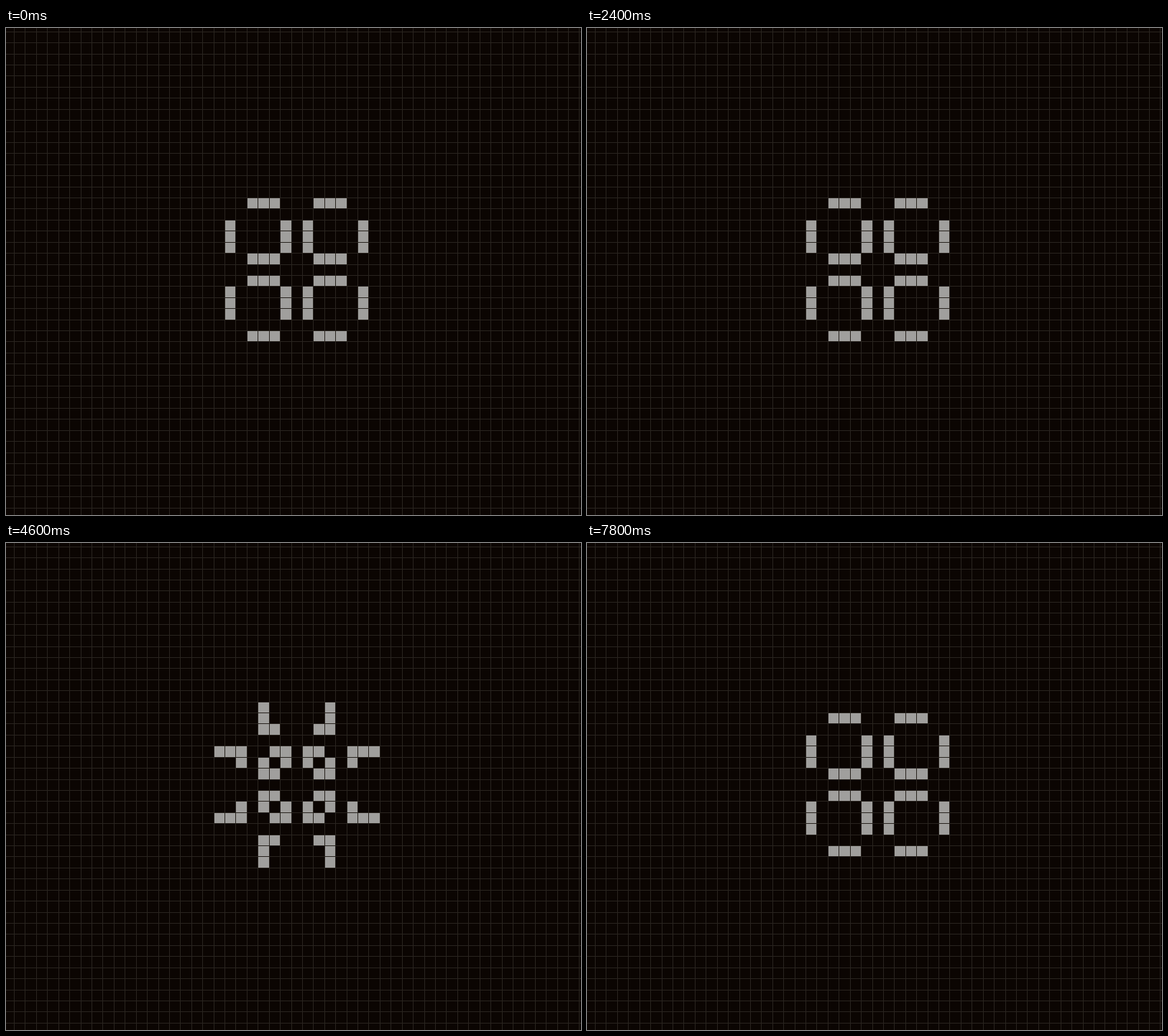
Write an HTML page with a canvas that moves like this. It is 800 by 678 pixels and loops after 7.9 s.

```html
<!DOCTYPE html>
<html>
<head>
<meta charset="utf-8">
<title>Pulsar</title>
<style>
html, body { margin: 0; width: 100%; height: 100%; overflow: hidden; background: #0b0502; }
canvas { display: block; }
</style>
</head>
<body>
<canvas id="stage" width="800" height="678"></canvas>
<script>
const ctx = document.getElementById('stage').getContext('2d');
const LOOP = 7900, HOLD = 400, STEP = 100;
const PITCH = 15.42, SIZE = 17;

// Pixel positions of the grid lines; board cell (0, 0) lies one cell outside the pulsar's widest phase.
const lineX = col => Math.floor(273.68 + col * PITCH);
const lineY = row => Math.floor(205.68 + row * PITCH);

// The pulsar's 48-cell phase: bars at distance 1 or 6 from the centre axes.
function pulsar() {
  return Array.from({ length: SIZE }, (_, y) => Array.from({ length: SIZE }, (_, x) => {
    const dx = Math.abs(x - 8), dy = Math.abs(y - 8);
    const onLine = d => d === 1 || d === 6;
    const onBar = d => d >= 2 && d <= 4;
    return (onLine(dx) && onBar(dy)) || (onLine(dy) && onBar(dx));
  }));
}

function nextGeneration(board) {
  const alive = (x, y) => board[y]?.[x] ? 1 : 0;
  return board.map((row, y) => row.map((cell, x) => {
    let sum = -alive(x, y);
    for (let j = -1; j <= 1; j++)
      for (let i = -1; i <= 1; i++) sum += alive(x + i, y + j);
    return sum === 3 || (cell && sum === 2);
  }));
}

const phases = [pulsar()];
phases.push(nextGeneration(phases[0]));
phases.push(nextGeneration(phases[1]));

function draw(board) {
  ctx.fillStyle = '#0b0502';
  ctx.fillRect(0, 0, 800, 678);
  ctx.fillStyle = '#29241f';
  for (let i = -18; i < 36; i++) {
    ctx.fillRect(lineX(i), 0, 1, 678);
    ctx.fillRect(0, lineY(i), 800, 1);
  }
  ctx.fillStyle = '#a09f9d';
  board.forEach((row, y) => row.forEach((cell, x) => {
    if (!cell) return;
    const left = lineX(x) + 1, top = lineY(y) + 1;
    ctx.fillRect(left, top, lineX(x + 1) - left, lineY(y + 1) - top);
  }));
}

function frame(now) {
  const t = now % LOOP;
  const generation = Math.max(0, Math.floor((t - HOLD) / STEP) + 1);
  draw(phases[generation % 3]);
  requestAnimationFrame(frame);
}
requestAnimationFrame(frame);
</script>
</body>
</html>
```
